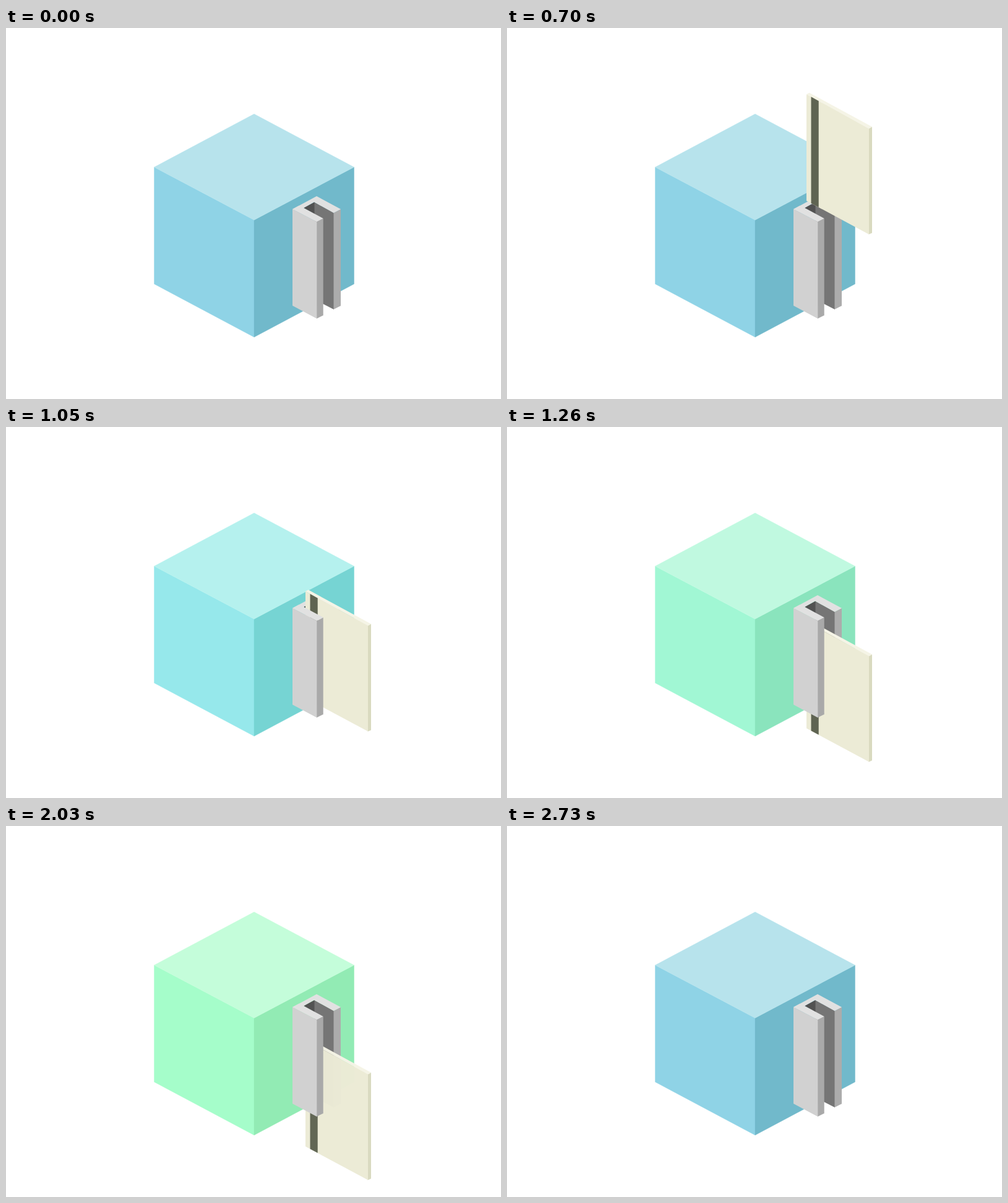
An HTML page that plays this animation: 800x600 px, repeating every 2.8 s.

```html
<!DOCTYPE html>
<html lang="en">
<head>
<meta charset="utf-8">
<title>Card swipe</title>
<style>
  html, body { margin: 0; width: 100%; height: 100%; overflow: hidden; background: #fff; }
  svg { display: block; width: 800px; height: 600px; }
</style>
</head>
<body>
<svg viewBox="0 0 800 600">
  <g id="cube">
    <path d="M239.5 225 401 310.5V500L239.5 414Z"/>
    <path d="M401 310.5 562.5 225V414L401 500Z"/>
    <path d="M401 139 562.5 225 401 310.5 239.5 225Z"/>
  </g>

  <!-- reader: base and back arm -->
  <path fill="#757575" d="M498 281.5 530 299V455.2L512 446 498 438Z"/>
  <path fill="#525252" d="M481 291 498.5 281.5V301Z"/>
  <path fill="#acacac" d="M529.5 299 541 293V449.3L529.5 455Z"/>
  <path fill="#e1e1e1" d="M463 293 502 272 541 293 529.5 299 498 281.5 481 291 473 297.5Z"/>

  <g id="card">
    <path fill="#d9dabf" d="M584.5 163.5 590 160.7V332.3L584.5 334.7Z"/>
    <path fill="#f5f4e6" d="M484 108 488.5 105.5 590 160.7 585 163.7Z"/>
    <path fill="#ecebd6" d="M484 108 585 163.5V334.5L484 280.3Z"/>
    <path fill="#5f6452" d="M491.5 112.1 503.7 118.8V290.8L491.5 284.3Z"/>
  </g>

  <!-- reader: front arm -->
  <path fill="#a9a9a9" d="M502 313.5 512.7 308V464.7L502 470Z"/>
  <path fill="#e1e1e1" d="M463 293 473 287.5 481 291 512.7 308 502 313.5Z"/>
  <path fill="#d1d1d1" d="M463 293 502.3 313.5V470L463 449Z"/>
</svg>
<script>
  const LOOP = 2800, STEP = 70;
  const TRAVEL = 305.5, LIFT = -67.5;
  // left, right and top face: idle, reading, accepted
  const SHADES = [
    ['#8fd3e6', '#96e8eb', '#a5fdca'],
    ['#71b9cb', '#76d4d3', '#92ebb4'],
    ['#b7e3ec', '#b5f1ee', '#c4fdda']
  ];
  const card = document.getElementById('card');
  const faces = [...document.getElementById('cube').children];

  const ramp = (t, from, to) => Math.min(1, Math.max(0, (t - from) / (to - from)));
  const mix = (a, b, k) => `color-mix(in srgb, ${b} ${k * 100}%, ${a})`;

  function shade([idle, reading, done], k) {
    return k < 0.25 ? mix(idle, reading, k * 4) : mix(reading, done, (k - 0.25) / 0.75);
  }

  function draw(t) {
    const swipe = 1 - Math.pow(1 - ramp(t, 600, 1768), 2.75);
    card.setAttribute('transform', `translate(0 ${LIFT + TRAVEL * swipe})`);
    card.style.opacity = ramp(t, 0, 410) - ramp(t, 2020, 2515);

    const k = ramp(t, 950, 1350) - ramp(t, 2595, 2725);
    faces.forEach((face, i) => {
      face.style.fill = face.style.stroke = shade(SHADES[i], k);
      face.style.strokeWidth = 0.4;
    });
  }

  const start = performance.now();
  function tick() {
    // small lead keeps each pose on time at its boundary
    const t = performance.now() - start + 6;
    draw(Math.floor(t / STEP) * STEP % LOOP);
    requestAnimationFrame(tick);
  }
  tick();
</script>
</body>
</html>
```
